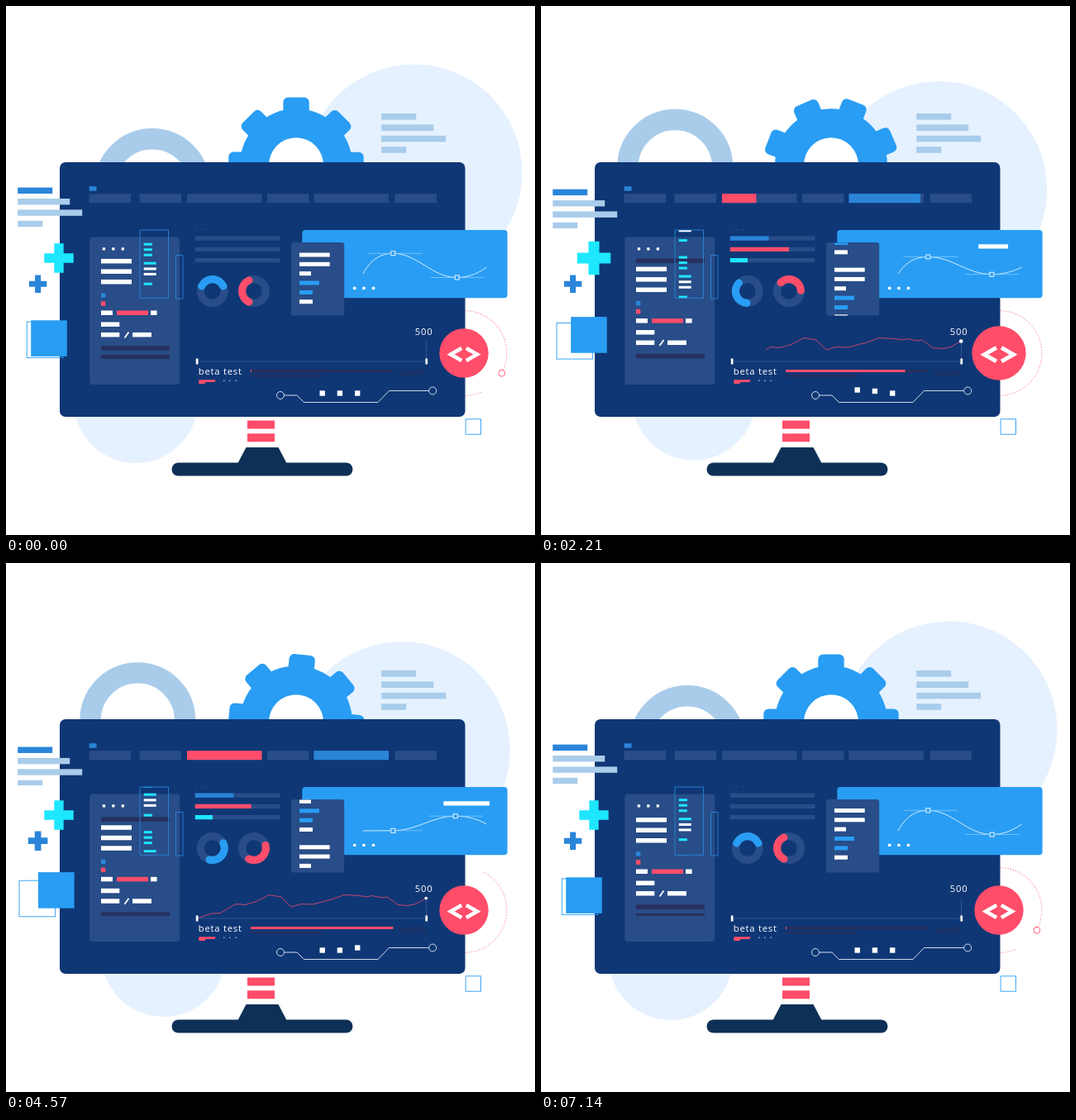
Animation, 640 px wide and 640 px high, one loop 7210 ms. Source, as an HTML page:

```html
<!DOCTYPE html>
<html lang="en">
<head>
<meta charset="utf-8">
<title>Software testing</title>
<style>
  html, body { margin: 0; width: 100%; height: 100%; overflow: hidden; background: #fff; }
  svg { display: block; width: 100vw; height: 100vh; }
  text { font: 11.3px "Open Sans", "Noto Sans", sans-serif; letter-spacing: .75px; fill: #fff; }
</style>
</head>
<body>
<svg viewBox="0 0 640 640">
  <defs>
    <clipPath id="clipLeft"><rect x="0" y="219" width="100" height="50"/></clipPath>
    <clipPath id="clipRight"><rect x="450" y="130" width="90" height="50"/></clipPath>
    <clipPath id="clipCode"><rect x="101" y="305" width="109" height="122"/></clipPath>
    <clipPath id="clipList"><rect x="162" y="271" width="35" height="82.5"/></clipPath>
    <clipPath id="clipCard"><rect x="345" y="286.5" width="64" height="88"/></clipPath>
  </defs>

  <!-- backdrop -->
  <circle id="bigDisc" cx="493.5" cy="201.5" r="131" fill="#e5f1ff"/>
  <circle id="lowDisc" cx="157" cy="478" r="75" fill="#e5f1ff"/>
  <circle id="arch" cx="177" cy="218" r="57.3" fill="#fff" stroke="#a9cceb" stroke-width="25.4"/>
  <g id="gear" fill="#299df3"><circle r="68"/></g>
  <circle cx="351" cy="192.3" r="33" fill="#fff"/>
  <g clip-path="url(#clipRight)"><g id="rightBars"></g></g>
  <g id="orbit" fill="none" stroke="#ff4d6a">
    <path id="orbitDots" stroke-width=".9" stroke-dasharray="1 2.1"/>
    <circle cx="51.4" r="3.8" stroke-width=".9"/>
  </g>

  <!-- monitor -->
  <rect x="65" y="189" width="490.5" height="308" rx="7" fill="#0f3775"/>
  <path d="M292 501.5h33v10h-33zM292 517.2h33v10h-33z" fill="#ff4d6a"/>
  <path d="M290.5 534H329.500L340 554H280z" fill="#0e3056"/>
  <rect x="200.500" y="552.500" width="219" height="16" rx="8" fill="#0e3056"/>
  <g id="screen"></g>

  <!-- code panel -->
  <rect x="101.200" y="279.500" width="109" height="178.500" rx="4" fill="#284d88"/>
  <path d="M116.800 292.200h3.300v3.300h-3.300zM128.200 292.200h3.300v3.300h-3.300zM139.700 292.200h3.300v3.300h-3.300z" fill="#fff"/>
  <g clip-path="url(#clipCode)"><g id="codeRows"></g></g>
  <g clip-path="url(#clipList)"><g id="listRows"></g></g>
  <path d="M162 271h34.500v82.300h-34.500zM205.500 301.500h8.500v52.500h-8.500z" fill="none" stroke="#2a85d9" stroke-width=".9"/>

  <!-- curve panel -->
  <rect x="358.300" y="271" width="248.300" height="82.300" rx="4" fill="#299df3"/>
  <path d="M420 339.700h3.400v3.400H420zM431.200 339.700h3.400v3.400h-3.400zM442.800 339.700h3.400v3.400h-3.400z" fill="#fff"/>
  <path id="curve" fill="none" stroke="#fff" stroke-width=".8"/>
  <g id="handleA"><path d="M-30 0H35.500" stroke="#8fd0ff" stroke-width=".7"/><rect x="-2.500" y="-2.500" width="5" height="5" fill="#299df3" stroke="#fff" stroke-width=".9"/></g>
  <g id="handleB"><path d="M-32 0H33" stroke="#8fd0ff" stroke-width=".7"/><rect x="-2.500" y="-2.500" width="5" height="5" fill="#299df3" stroke="#fff" stroke-width=".9"/></g>
  <g id="curveLabel"></g>
  <rect x="345" y="286" width="64.200" height="88.500" rx="3" fill="#284d88"/>
  <g clip-path="url(#clipCard)"><g id="cardRows"></g></g>

  <!-- donuts -->
  <g fill="none" stroke-width="9.200">
    <circle cx="249.800" cy="345" r="14.400" stroke="#284d88"/>
    <circle cx="300" cy="345" r="14.400" stroke="#284d88"/>
    <path id="donutBlue" stroke="#299df3" stroke-linecap="round"/>
    <path id="donutRed" stroke="#ff4d6a" stroke-linecap="round"/>
  </g>

  <!-- chart -->
  <path d="M231 430H508.500V406" fill="none" stroke="#3a5c94" stroke-width=".8"/>
  <path id="chart" pathLength="1" fill="none" stroke="#d8476e" stroke-width=".9"
    d="M231 430 249 424 259 423.700 278 412.500 289 413.500 303 409.500 318 401.500 333 404 345 416 357 412.500 371 413 394 407 409 401.500 427 402.500 437 404 443 402.500 455 405 461 404 474 413.500 486 414.500 496 412.500 508 405.500"/>
  <path d="M229.800 426.500h2.700v7h-2.700zM507.400 426.500h2.700v7h-2.700z" fill="#fff"/>
  <circle id="chartDot" cx="508.200" cy="405.500" fill="#fff"/>
  <text x="494.800" y="398">500</text>
  <text x="232.800" y="446.300">beta test</text>
  <path d="M233.300 452.300h20.500l-1.500 2.700h-10.800l-1 2h-7.200z" fill="#ff4d6a"/>
  <path d="M263 452.500h1.500v1.500H263zM270 452.500h1.500v1.500H270zM277.300 452.500h1.500v1.500h-1.500z" fill="#9db3d6"/>
  <path id="hatch" stroke="#2a2f5c" stroke-width="1.600"/>
  <g fill="none" stroke="#e4ecf8" stroke-width=".9">
    <circle cx="332" cy="471" r="4.500"/><circle cx="516.200" cy="465.500" r="4.500"/>
    <path d="M336.500 471H352l8.500 8.500H450l13.500-14h48"/>
  </g>
  <g id="hopDots" fill="#fff"></g>

  <!-- floating parts -->
  <g clip-path="url(#clipLeft)"><g id="leftBars"></g></g>
  <path id="plusBig" d="M-5.700-17.700H5.700V-5.700H17.700V5.700H5.700V17.700H-5.700V5.700H-17.700V-5.700H-5.700z" fill="#1ee6ff"/>
  <path id="plusSmall" d="M-3.500-10.700H3.500V-3.500H10.700V3.500H3.500V10.700H-3.500V3.500H-10.700V-3.500H-3.500z" fill="#2a85d9"/>
  <rect id="boxLine" x="25.300" y="382" width="43.600" height="43.600" fill="none" stroke="#299df3" stroke-width=".9"/>
  <rect id="boxFill" x="30.200" y="380.300" width="43.600" height="43.600" fill="#299df3"/>
  <rect id="spinner" x="-9.200" y="-9.200" width="18.400" height="18.400" fill="none" stroke="#299df3" stroke-width=".9"/>
  <g id="badge">
    <circle r="29.700" fill="#ff4d6a"/>
    <path d="M-2.800-6 -16 1.500 -2.800 9M2.800-6 16 1.500 2.800 9" fill="none" stroke="#fff" stroke-width="4.500"/>
  </g>
</svg>
<script>
const RUN = 7140, HOLD = 70, HALF = RUN / 2, THIRD = RUN / 3, QUARTER = RUN / 4;
const WHITE = '#fff', RED = '#ff4d6a', CYAN = '#1ee6ff', BLUE = '#2a85d9',
      PALE = '#a9cceb', SLOT = '#284d88', DARK = '#27305e';
const $ = id => document.getElementById(id);

function add(parent, tag, attrs) {
  const el = document.createElementNS('http://www.w3.org/2000/svg', tag);
  for (const key in attrs) el.setAttribute(key, attrs[key]);
  return $(parent).appendChild(el);
}
const bar = (parent, x, y, width, height, fill) => add(parent, 'rect', { x, y, width, height, fill });
const move = (id, x, y, extra = '') => $(id).setAttribute('transform', `translate(${x} ${y}) ${extra}`);

const clamp = u => Math.min(1, Math.max(0, u));
const smooth = u => (u = clamp(u), u * u * (3 - 2 * u));
const cubic = u => (u = clamp(u), u < .5 ? 4 * u ** 3 : 1 - 4 * (1 - u) ** 3);
const sine = u => (1 - Math.cos(Math.PI * clamp(u))) / 2;
const hump = (t, start, length) => Math.sin(Math.PI * clamp((t - start) / length));
const mod = (a, n) => ((a % n) + n) % n;

function arc(cx, cy, r, from, to) {
  const at = a => `${cx + r * Math.cos(a * Math.PI / 180)} ${cy + r * Math.sin(a * Math.PI / 180)}`;
  return `M${at(from)}A${r} ${r} 0 ${to - from > 180 ? 1 : 0} 1 ${at(to)}`;
}

// Static repeats
for (let i = 0; i < 8; i++)
  add('gear', 'rect', { x: -15.7, y: -81.7, width: 31.4, height: 26, rx: 6, transform: `rotate(${i * 45})` });
[42, 63, 78, 30].forEach((w, i) => {
  bar('leftBars', 14.2, 219.6 + i * 13.4, w, 7.4, i ? PALE : BLUE);
  bar('rightBars', 454.2, 130 + i * 13.4, w, 7.6, PALE);
});
$('orbitDots').setAttribute('d', arc(0, 0, 51.4, 39, 355));
$('hatch').setAttribute('d', [0, 1, 2, 3, 4, 5].map(i => `M${476 + i * 5.4} 440l4.500 8.500`).join(''));

bar('screen', 100.700, 218.200, 8.800, 5.500, BLUE);
[[100.500, 50.500], [161.500, 50.500], [219, 90.500], [316, 50.500], [372.500, 90.500], [470.500, 50.500]]
  .forEach(([x, w]) => bar('screen', x, 227.200, w, 11, SLOT));
[278.500, 291.800, 305].forEach((y, i) => {
  bar('screen', 228.800, y, 102.500, 5.200, SLOT);
  bar('screen', 229.500 + i * 7, 270, 1.500, 1.500, SLOT);
});
bar('screen', 296.300, 440, 172, 3, '#2a2f5c');
bar('screen', 296.300, 445.700, 86, 3, '#202f62');
bar('screen', 296, 440, 1, 3, RED);

// Bars that fill and empty: element, full width, fill start, empty start
const fills = [
  ['screen', 219, 227.200, 90.500, 11, RED, 100, 1931],
  ['screen', 372.500, 227.200, 90.500, 11, BLUE, 250, 2145],
  ['screen', 228.800, 278.500, 46.700, 5.200, BLUE, 330, 2250],
  ['screen', 228.800, 291.800, 71.200, 5.200, RED, 540, 2400],
  ['screen', 228.800, 305, 21.200, 5.200, CYAN, 440, 2330],
  ['screen', 296.300, 440, 172, 3, RED, 250, 2076],
  ['curveLabel', 529.300, 288.300, 55.700, 5.200, WHITE, 300, 1997]
].map(([parent, x, y, w, h, color, on, off]) => ({ el: bar(parent, x, y, 0, h, color), w, on, off }));

// Endless lists: two stacked copies, one period apart
const scrolls = [
  { id: 'codeRows', base: 306, period: 126, travel: -376, h: 5.500, rows: [
    [0, 115, 37, WHITE], [12.500, 115, 37, WHITE], [25, 115, 37, WHITE],
    [41.300, 115, 5.300, BLUE], [51.300, 115, 5.300, RED],
    [62.500, 115, 14, WHITE], [62.500, 134, 38, RED], [62.500, 175, 7.600, WHITE],
    [76.500, 115, 22.300, WHITE], [89, 115, 22.300, WHITE], [89, 153, 23, WHITE],
    [105.300, 115, 83, DARK], [116, 115, 83, DARK]] },
  { id: 'listRows', base: 286.700, period: 68.500, travel: 272.500, h: 3, rows: [
    [0, 166.700, 10.200, CYAN], [6.500, 166.700, 10.200, CYAN], [13, 166.700, 10.200, CYAN],
    [23, 166.700, 15, CYAN], [29.700, 166.700, 15, WHITE], [36.200, 166.700, 15, WHITE],
    [48, 166.700, 10.200, CYAN]] },
  { id: 'cardRows', base: 298.500, period: 78, travel: 310.500, h: 5, rows: [
    [0, 355, 36.700, WHITE], [11.300, 355, 36.700, WHITE], [22.600, 355, 14, WHITE],
    [34, 355, 24, '#299df3'], [45.400, 355, 16, '#299df3'], [56.700, 355, 16, WHITE]] }
];
for (const s of scrolls)
  for (const top of [s.base - s.period, s.base]) {
    s.rows.forEach(([y, x, w, color]) => bar(s.id, x, top + y, w, s.h, color));
    if (s.id === 'codeRows')
      add(s.id, 'path', { d: `M143.500 ${top + 95.500}l5-7`, stroke: WHITE, 'stroke-width': 1.800 });
  }

const hops = [379.500, 400.700, 422].map(x => bar('hopDots', x, 465.300, 6.400, 6.400, WHITE));

// Leaves through the top of its window, then comes back from below
function rollOffset(t) {
  t = mod(t, THIRD);
  return t < 1860 ? -54 * clamp((t - 1340) / 500) ** 3 : 54 * (1 - clamp((t - 1880) / 500)) ** 3;
}

function draw(t) {
  const half = t % HALF, turn = 360 * t / RUN;
  const drift = (1 - Math.cos(2 * Math.PI * t / RUN)) / 2;

  move('bigDisc', -18 * drift, 30 * drift);
  move('lowDisc', 41 * drift, -5 * drift);
  move('arch', -21.600 * drift, -34 * drift);
  move('gear', 351, 192.300, `rotate(${turn})`);
  move('orbit', 554.500, 420, `rotate(${28 + turn})`);
  move('leftBars', 0, rollOffset(t));
  move('rightBars', 0, rollOffset(t + 1310));
  move('spinner', 565.300, 509, `rotate(${-270 * cubic((t % THIRD - 571) / 1045)})`);

  const pulse = hump(half, 1785, 892);
  move('plusBig', 64, 305, `scale(${1 + .145 * pulse})`);
  move('badge', 554, 420, `scale(${1 + .1 * pulse})`);
  move('plusSmall', 38.600, 336.200, `scale(${1 + .16 * hump(half, 800, 900)})`);

  const apart = sine(half / 950) - sine((half - 1738) / 1220);
  move('boxFill', 8.800 * apart, -6.200 * apart);
  move('boxLine', -9.300 * apart, 2.200 * apart);

  $('donutBlue').setAttribute('d', arc(249.800, 345, 14.400, -155 - turn, -25 - turn));
  $('donutRed').setAttribute('d', arc(300, 345, 14.400, 115 + turn, 245 + turn));

  for (const f of fills)
    f.el.setAttribute('width', f.w * (smooth((half - f.on) / 530) - smooth((half - f.off) / 530)));

  const from = smooth((half - 2040) / 700), to = smooth((half - 150) / 830);
  $('chart').setAttribute('stroke-dasharray', `0 ${from} ${to - from} 2`);
  $('chartDot').setAttribute('r', 2.300 * (smooth((half - 750) / 350) - smooth((half - 2600) / 300)));

  const bend = sine((half - 300) / 550) - sine((half - 1810) / 550);
  const a = 299.300 + 24.500 * bend, b = 328.500 - 22.300 * bend, bx = 545.700 - 2 * bend;
  move('handleA', 468.300, a);
  move('handleB', bx, b);
  $('curve').setAttribute('d', `M432 324C440 ${a + (324 - a) * .4} 451 ${a} 468.300 ${a}` +
    `C498 ${a} 515 ${b} ${bx} ${b}C560 ${b} 572 ${b + (316 - b) * .45} 581.500 316`);

  for (const s of scrolls) move(s.id, 0, mod(s.travel * t / RUN, s.period));
  hops.forEach((el, i) => el.setAttribute('y', 465.300 - 4 * hump(t % QUARTER, 60 + 215 * i, 700)));
}

const begin = performance.now();
function frame() {
  draw(Math.min((performance.now() - begin) % (RUN + HOLD), RUN));
  requestAnimationFrame(frame);
}
frame();
</script>
</body>
</html>
```
